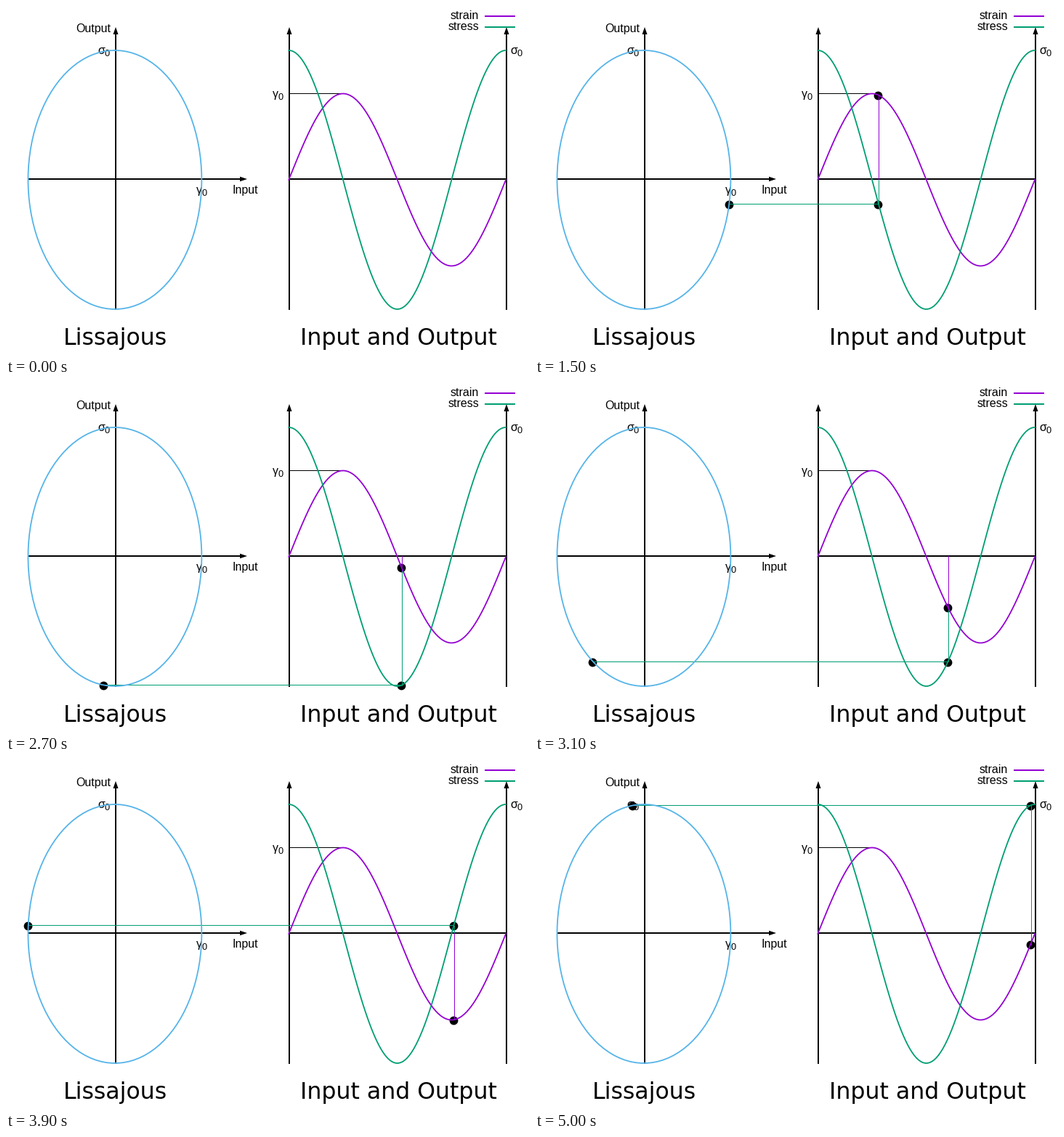
A matplotlib script that plays this animation: 720 px wide and 480 px high, repeating every 5.1 s.

```python
import numpy as np
import matplotlib.pyplot as plt
from matplotlib.animation import FuncAnimation
from matplotlib.patches import Circle, Polygon

W, H, DPI = 720, 480, 80
PX = 72 / DPI                       # points per pixel
STEPS = 50

PURPLE, GREEN, BLUE = "#9400d3", "#009e73", "#56b4e9"

ORBIT_X, WAVE_X, PERIOD = 149.9, 389.3, 298.8
MID_Y = 239
STRAIN_AMP, STRESS_AMP, ORBIT_AMP = 118.5, 178, 119.5

fig = plt.figure(figsize=(W / DPI, H / DPI), dpi=DPI, facecolor="white")
ax = fig.add_axes([0, 0, 1, 1])
ax.set_xlim(0, W)
ax.set_ylim(H, 0)
ax.axis("off")


def line(xs, ys, color="black", width=2, z=3):
    item, = ax.plot(xs, ys, color=color, lw=width * PX, zorder=z,
                    antialiased=False, solid_capstyle="butt", snap=True)
    return item


def curve(xs, ys, color, z):
    ax.plot(xs, ys, color=color, lw=1.8 * PX, zorder=z, snap=False)


def label(x, y, text, size=16, ha="left", font="Liberation Sans"):
    ax.text(x, y, text, fontsize=size * PX, ha=ha, va="baseline",
            family=font, color="black", zorder=1)


def subscripted(x, y, letter, advance):
    label(x, y, letter)
    label(x + advance, y + 3, "0", 12.8)


def arrow_head(points):
    ax.add_patch(Polygon(points, closed=True, fc="black", ec="none",
                         snap=False, zorder=3))


def up_axis(x):
    line([x, x], [32, 417.5])
    arrow_head([(x, 29), (x - 3.5, 39), (x + 3.5, 39)])


def state(phase):
    """Input position on the orbit, then strain and stress heights."""
    return (ORBIT_X + ORBIT_AMP * np.sin(phase),
            MID_Y - STRAIN_AMP * np.sin(phase),
            MID_Y - STRESS_AMP * np.cos(phase))


# Axes
up_axis(151)
up_axis(390)
up_axis(689)
line([30, 328], [238, 238])
arrow_head([(332, 238), (322, 234.7), (322, 241.3)])
line([390, 689], [238, 238])
line([390, 463], [120, 120], width=1)

# Curves
t = np.linspace(0, 2 * np.pi, 100)
wave_x = WAVE_X + PERIOD * t / (2 * np.pi)
orbit_x, strain_y, stress_y = state(t)
curve(wave_x, strain_y, PURPLE, 6)
curve(wave_x, stress_y, GREEN, 7)
curve(orbit_x, stress_y, BLUE, 7)

# Legend
line([658.5, 701], [14, 14], PURPLE, z=7)
line([658.5, 701], [29, 29], GREEN, z=7)
label(651, 18, "strain", ha="right")
label(651, 33, "stress", ha="right")

# Labels
label(96, 36, "Output")
label(311.4, 258, "Input")
subscripted(126.5, 66, "σ", 9.2)
subscripted(694.5, 66, "σ", 9.2)
subscripted(367, 126, "γ", 7.8)
subscripted(262, 258, "γ", 7.8)
label(150.5, 466, "Lissajous", 31.5, "center", "DejaVu Sans")
label(540, 466, "Input and Output", 31.5, "center", "DejaVu Sans")

# Moving parts
dots = [ax.add_patch(Circle((0, 0), 5.9, fc="black", ec="none",
                            zorder=2)) for _ in range(3)]
level = line([], [], GREEN, 1, z=4)
stress_drop = line([], [], GREEN, 1, z=4)
strain_drop = line([], [], PURPLE, 1, z=5)
moving = dots + [level, stress_drop, strain_drop]


def update(i):
    for item in moving:
        item.set_visible(i > 0)
    if i == 0:
        return moving

    turn = (i - 1) / STEPS
    x = WAVE_X + PERIOD * turn
    orbit, strain, stress = state(2 * np.pi * turn)

    # Markers sit one pixel below and left of their guide lines
    spots = [(orbit, stress), (x, stress), (x, strain)]
    for dot, (dx, dy) in zip(dots, spots):
        dot.center = (np.floor(dx) + 0.5, np.floor(dy) + 1.5)

    # Whole coordinates snap to the middle of the pixel
    gx, gy = np.floor(x) + 1, np.floor(stress)
    level.set_data([orbit, x], [gy, gy])
    stress_drop.set_data([gx, gx], [238, stress])
    strain_drop.set_data([gx, gx], [238, strain])
    return moving


anim = FuncAnimation(fig, update, frames=STEPS + 1, interval=100,
                     init_func=lambda: update(0), repeat=True,
                     repeat_delay=0, blit=False)
plt.show()
```
